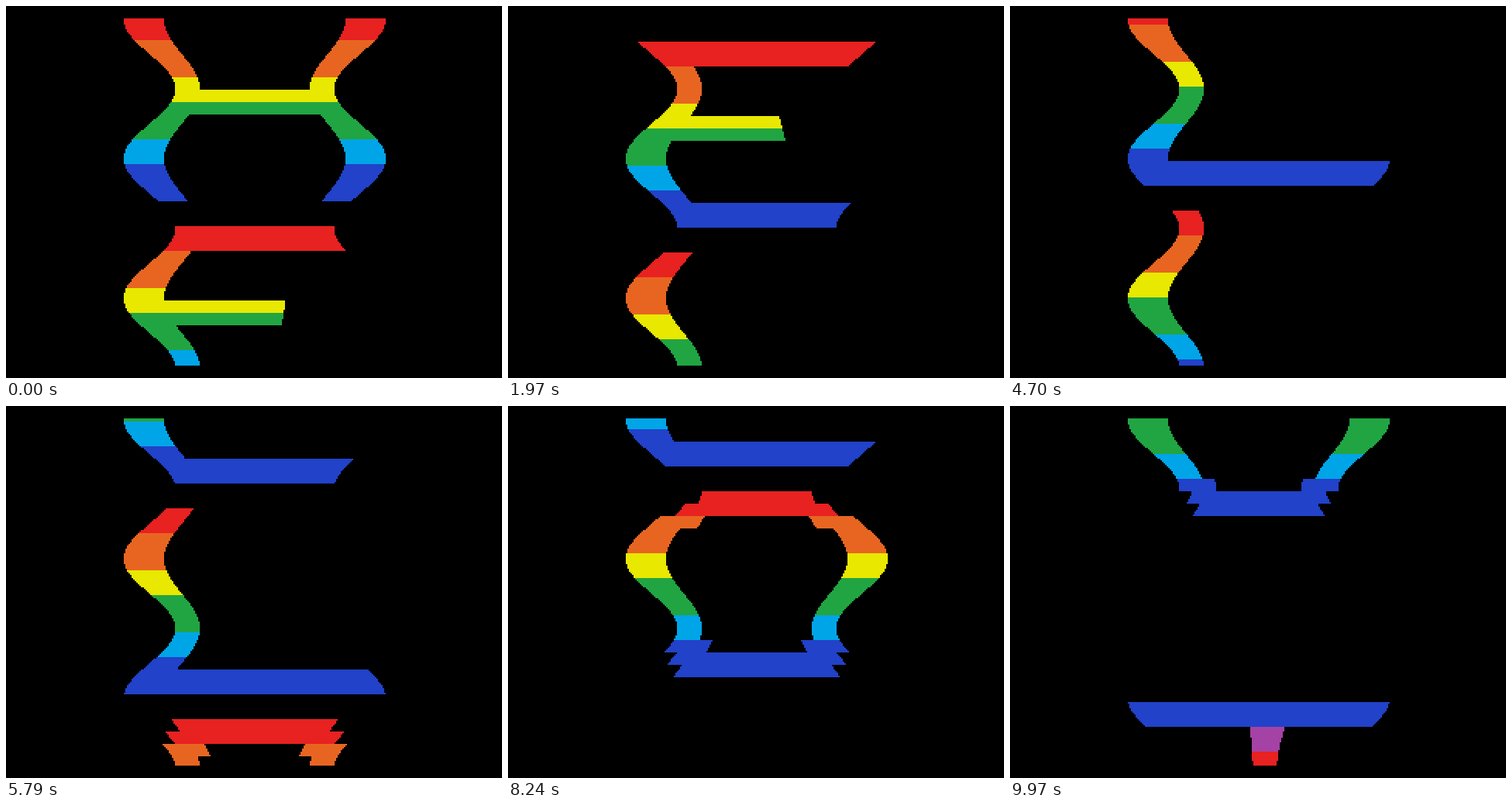
Write an HTML page with a canvas that moves like this. It is 640x480 px and loops after 10000 ms.

```html
<!DOCTYPE html>
<html lang="en">
<head>
<meta charset="utf-8">
<title>Wavy rainbow scroller</title>
<style>
  html, body { margin: 0; width: 100%; height: 100%; overflow: hidden; background: #000; }
  canvas { display: block; width: 640px; height: 480px; }
</style>
</head>
<body>
<canvas id="stage" width="640" height="480"></canvas>
<script>
const ctx = document.getElementById('stage').getContext('2d');

const LOOP = 10000;
const PIXEL = 2;           // one logical pixel is 2 x 2 on the stage
const CELL = 8;            // font cell in logical pixels
const PITCH = 17;          // rows from one letter to the next
const TOP = 8, LINES = 224, CENTER = 160;

const RED = '#e82121', ORANGE = '#e86521', YELLOW = '#e8e800', GREEN = '#21a542',
      CYAN = '#00a5e8', BLUE = '#2142c9', PURPLE = '#a542a5';
const ROW_COLORS = [[RED, 2], [ORANGE, 3], [YELLOW, 2], [GREEN, 3], [CYAN, 2], [BLUE, 3], [PURPLE, 2]]
  .flatMap(([color, rows]) => Array(rows).fill(color));

// Each glyph maps a row to column spans [from, to) on a grid 13 columns wide.
const FULL = [[0, 13]], STEM = [[0, 2]], SIDES = [[0, 2], [11, 13]], MIDDLE = [[6, 8]];
const isCrossbar = row => row === 6 || row === 7;
const isBase = row => row === 13 || row === 14;
const letter = shape => row => row < 15 ? shape(row) : [];

const H = letter(row => isCrossbar(row) ? FULL : SIDES);
const E = letter(row => row < 2 || isBase(row) ? FULL : isCrossbar(row) ? [[0, 8]] : STEM);
const L = letter(row => isBase(row) ? FULL : STEM);
const O = letter(row => {
  const edge = Math.min(row, 14 - row);
  if (edge < 2) return [[2 - edge, 11 + edge]];
  return edge === 2 ? [[0, 3], [10, 13]] : SIDES;
});
const base = row => row < 13 ? [] : isBase(row) ? FULL : MIDDLE;
const tail = () => MIDDLE;
const GLYPHS = [H, E, L, L, O, base, tail];

function drawLine(line, scroll) {
  const row = Math.floor((line + 2 + scroll) / CELL);
  const glyph = GLYPHS[Math.floor(row / PITCH)];
  if (!glyph) return;
  const scale = 1.306 + 0.32 * Math.cos(line * 4 * Math.PI / 180);
  const edge = col => Math.ceil(CENTER + (col - 6.5) * CELL * scale);
  ctx.fillStyle = ROW_COLORS[row % PITCH];
  for (const [from, to] of glyph(row % PITCH)) {
    const x = edge(from);
    ctx.fillRect(x * PIXEL, (TOP + line) * PIXEL, (edge(to) - x) * PIXEL, PIXEL);
  }
}

function draw(now) {
  const time = now % LOOP;
  // 33 pictures per second, scrolling 60 logical pixels per second
  const step = Math.floor((Math.floor(time / 10) + 0.5) * 0.33);
  const scroll = Math.ceil(step * 20 / 11);
  ctx.fillStyle = '#000';
  ctx.fillRect(0, 0, 640, 480);
  for (let line = 0; line < LINES; line++) drawLine(line, scroll);
}

function tick() {
  draw(performance.now());
  requestAnimationFrame(tick);
}
tick();
</script>
</body>
</html>
```
